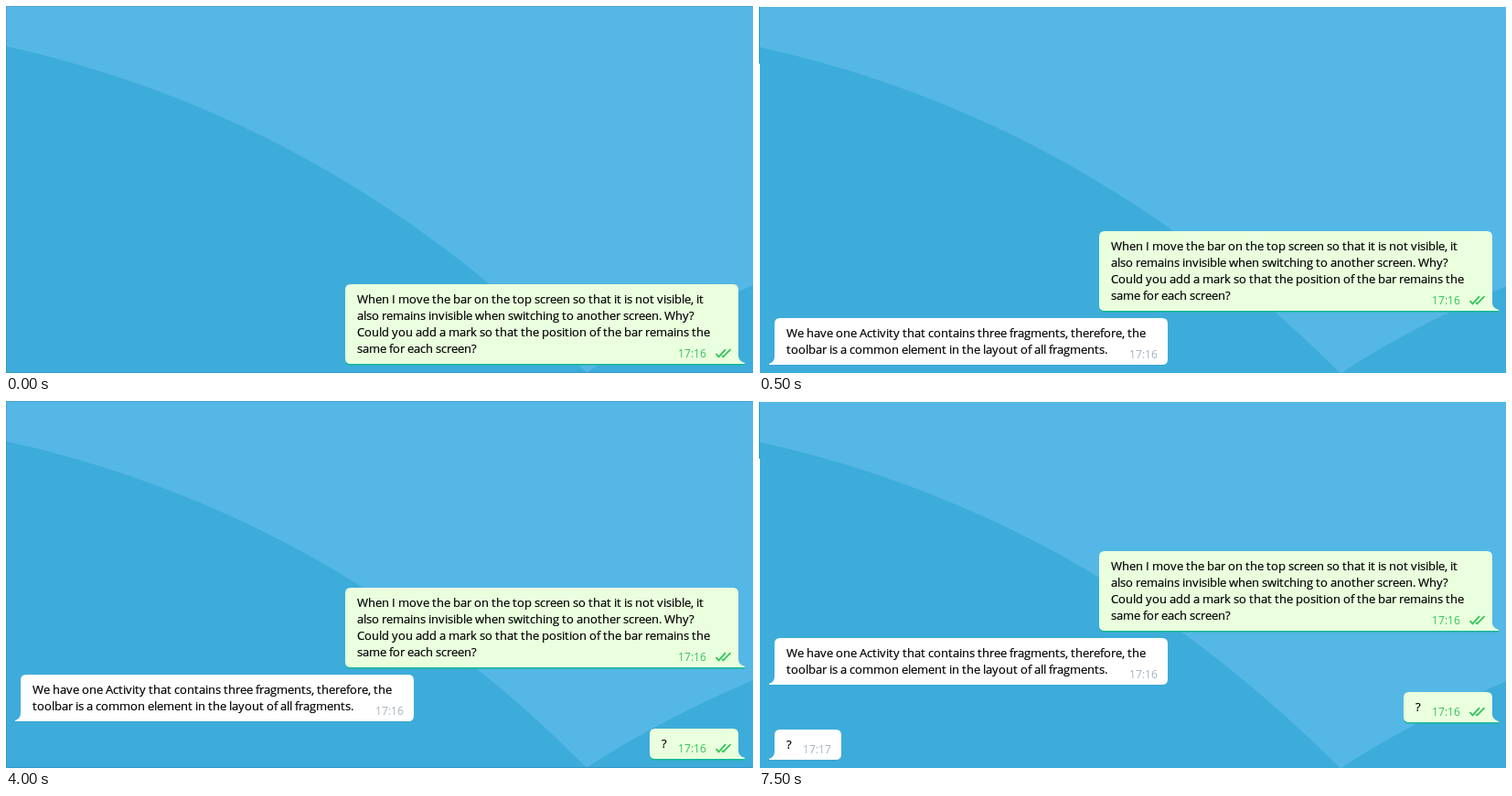
Write an HTML page that moves like this. It is 817 px wide and 401 px high and loops after 8 s.

```html
<!DOCTYPE html>
<html lang="en">
<head>
<meta charset="utf-8">
<title>Chat</title>
<style>
  html, body { margin: 0; width: 100%; height: 100%; overflow: hidden; background: #54b7e5; }
  svg { display: block; }
  text { font: 13px "Open Sans", "Noto Sans", sans-serif; fill: #000; stroke: #000; stroke-width: .2; white-space: pre; }
  .time { font-size: 12px; stroke: none; }
</style>
</head>
<body>
<svg id="stage" width="817" height="401" viewBox="0 0 817 401">
  <g id="scene">
    <path fill="#3dacda" d="M-2 43.6 L0 44 Q358 122.7 635 400.5 Q712 350 818 304.5 V403 H-2 Z"/>
    <g id="chat"></g>
  </g>
  <path id="darkEdge" d="M817 .5H.5V400.5H817" stroke="#004" stroke-opacity=".12" fill="none"/>
  <g id="lightEdge" fill="none">
    <path d="M817 .5H.5V401" stroke="#fff"/>
    <path d="M.5 1V63" stroke="#1f9fd4"/>
  </g>
</svg>
<script>
const LOOP = 8000;
const messages = [
  { top: 0, left: 371, width: 430, sent: true, time: "17:16", lines: [
    "When I move the bar on the top screen so that it is not visible, it",
    "also remains invisible when switching to another screen. Why?",
    "Could you add a mark so that the position of the bar remains the",
    "same for each screen?"] },
  { top: 95, left: 16, width: 430, time: "17:16", lines: [
    "We have one Activity that contains three fragments, therefore, the",
    "toolbar is a common element in the layout of all fragments."] },
  { top: 154, left: 704, width: 97, sent: true, time: "17:16", lines: ["?"] },
  { top: 195, left: 16, width: 73, time: "17:17", lines: ["?"] }
];
// Each step shows one more message; odd steps sit one pixel to the right.
const steps = [
  { at: 0, y: 304, x: 0 },
  { at: 500, y: 246, x: 1 },
  { at: 4000, y: 204, x: 0 },
  { at: 7500, y: 164, x: 1 }
];

const $ = id => document.getElementById(id);
const pen = document.createElement("canvas").getContext("2d");

// Whole-pixel letter advances, as in text drawn without subpixel positioning.
function snappedText(string, x, y, size, attributes = "") {
  pen.font = `${size}px "Open Sans", "Noto Sans", sans-serif`;
  const positions = [...string].map(letter => {
    const position = x;
    x += Math.round(pen.measureText(letter).width);
    return position;
  });
  return `<text x="${positions.join(" ")}" y="${y}" ${attributes}>${string}</text>`;
}

function bubblePath({ left, width, sent }, height) {
  const r = 6, right = left + width;
  return sent
    ? `M${left + r} 0H${right - r}q${r} 0 ${r} ${r}V${height - 9}q0 6 7 8v1H${left + r}q${-r} 0 ${-r} ${-r}V${r}q0 ${-r} ${r} ${-r}Z`
    : `M${left + r} 0H${right - r}q${r} 0 ${r} ${r}V${height - r}q0 ${r} ${-r} ${r}H${left - 6}v-1q6 -2 6 -8V${r}q0 ${-r} ${r} ${-r}Z`;
}

function bubble(message) {
  const { top, left, width, sent, time, lines } = message;
  const height = 15 + 18 * lines.length, right = left + width;
  const path = bubblePath(message, height);
  const accent = sent ? "#35c25b" : "#a6b4bf";
  const text = lines.map((line, i) => snappedText(line, left + 13, 21 + 18 * i, 13)).join("");
  const clock = snappedText(time, right - (sent ? 66 : 42), height - 7, 12,
    `class="time" style="fill:${accent}"`);
  const ticks = sent ? `<path transform="translate(${right - 25} ${height - 17})" fill="none"
    stroke="${accent}" stroke-width="1.8" d="M.5 6L3.5 9.3L11 1.2M7 8L8.5 9.3L16.5 1.2"/>` : "";
  return `<g transform="translate(0 ${top})">
    <path d="${path}" transform="translate(0 ${sent ? 1.5 : 1})" fill="${sent ? "#14b894" : "#39a3d0"}"/>
    <path d="${path}" fill="${sent ? "#e9ffde" : "#fff"}"/>${text}${clock}${ticks}</g>`;
}

$("chat").innerHTML = messages.map(bubble).join("");
const bubbles = [...$("chat").children];

const show = (element, visible) =>
  element.setAttribute("visibility", visible ? "visible" : "hidden");

function render(t) {
  const index = steps.findLastIndex(step => step.at <= t);
  const { x, y } = steps[index];
  $("scene").setAttribute("transform", `translate(${x} ${x})`);
  $("chat").setAttribute("transform", `translate(0 ${y - x})`);
  show($("darkEdge"), !x);
  show($("lightEdge"), x);
  bubbles.forEach((element, i) => show(element, i <= index));
}

const start = performance.now();
function tick() {
  render((performance.now() - start) % LOOP);
  requestAnimationFrame(tick);
}
tick();
</script>
</body>
</html>
```
